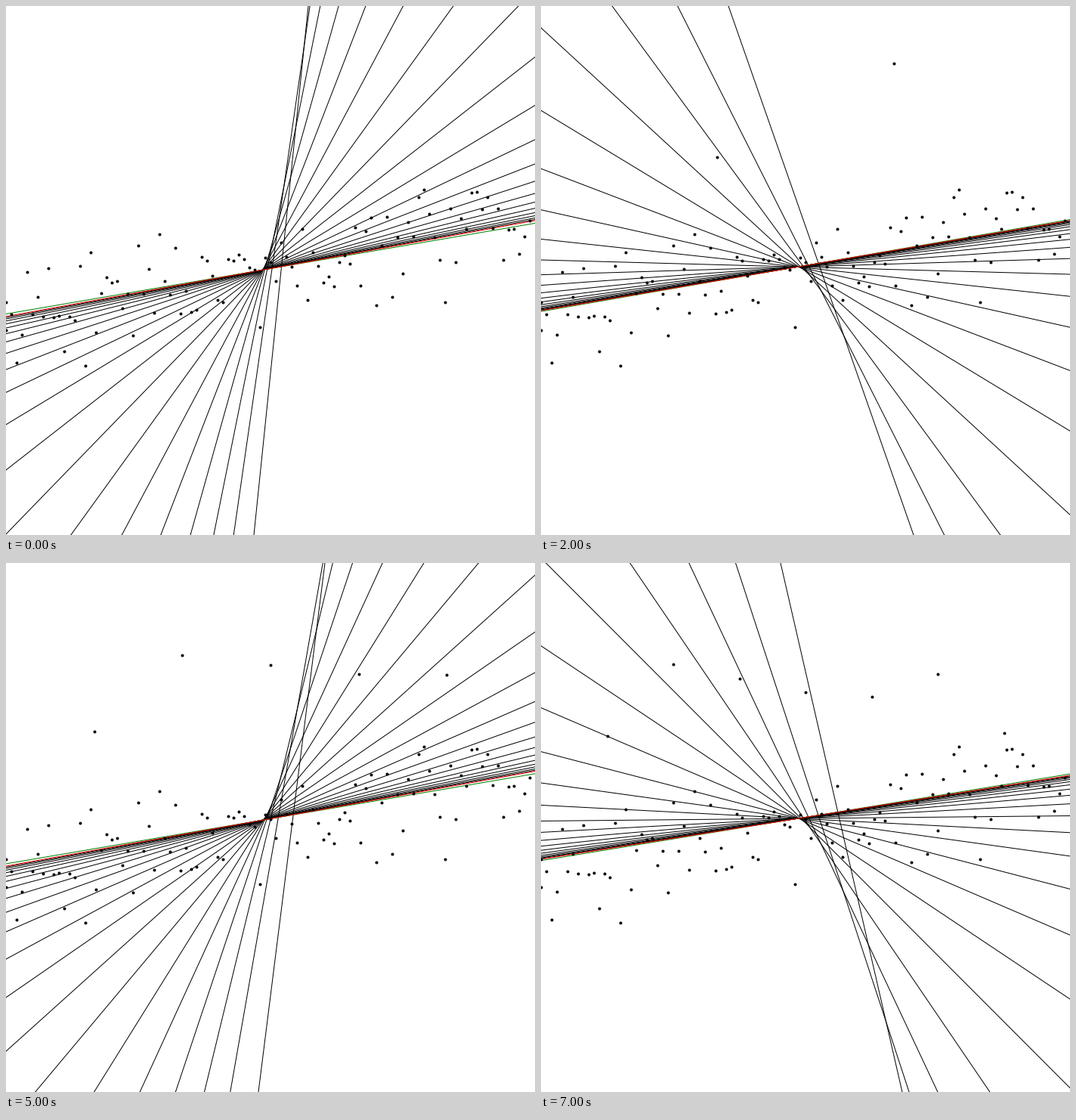
Write a matplotlib script that moves like this. It is 700x700 px and loops after 8000 ms.

```python
import numpy as np
import matplotlib.pyplot as plt
from matplotlib.animation import FuncAnimation
from matplotlib.collections import LineCollection

SIZE, DPI = 700, 100
FRAMES, STEPS = 8, 20
RATE, RIDGE = 0.635, 0.039      # descent rate and slope penalty
CENTRE, SCALE = 348, 315        # maps x to the regression variable

# Extra points share one slope; these are their heights above it
EXTRA_SLOPE = -0.2
EXTRA = np.array([429, 246.5, 169, 205.3, 240.8, 264.6, 252, 347.5])

# Where the first guess meets the top and bottom edges
GUESS = [(400, 328), (295, 380), (248, 493), (400, 318),
         (416, 313), (422, 334), (280, 440), (317, 478)]


def make_cloud(count=100, start=412.3, slope=-0.186, spread=36):
    """Evenly spaced noisy points whose best line is exactly the given one."""
    x = np.arange(count) * SIZE / count
    noise = np.random.default_rng(4).normal(size=count)
    noise -= np.polyval(np.polyfit(x, noise, 1), x)
    return x, start + slope * x + spread * noise / noise.std()


CLOUD_X, CLOUD_Y = make_cloud()


def points(n):
    """The cloud plus n + 1 evenly spread extra points."""
    x = SIZE * np.arange(n + 1) / (n + 1)
    y = EXTRA[:n + 1] + EXTRA_SLOPE * x
    return np.append(CLOUD_X, x), np.append(CLOUD_Y, y)


def descend(x, y, guess):
    """Weights of every descent step and of the exact solution."""
    u = (x - CENTRE) / SCALE
    hess = np.array([[np.mean(u * u) + RIDGE, u.mean()], [u.mean(), 1]])
    grad = np.array([np.mean(u * y), y.mean()])
    top, bottom = guess
    slope = SIZE / (bottom - top)
    w = np.array([slope * SCALE, slope * (CENTRE - top)])
    path = [w]
    for _ in range(STEPS):
        w = w - RATE * (hess @ w - grad)
        path.append(w)
    return path, np.linalg.solve(hess, grad)


def segment(w):
    x = np.array([-10, SIZE + 10])
    return np.column_stack([x, w[0] * (x - CENTRE) / SCALE + w[1]])


fig = plt.figure(figsize=(SIZE / DPI, SIZE / DPI), dpi=DPI, facecolor="white")
ax = fig.add_axes([0, 0, 1, 1])
ax.set_xlim(0, SIZE)
ax.set_ylim(SIZE, 0)
ax.axis("off")

px = 72 / DPI
lines = LineCollection([], linewidths=px)
ax.add_collection(lines, autolim=False)
dots, = ax.plot([], [], "o", color="black", ms=4 * px, mew=0, zorder=3)


def draw(n):
    x, y = points(n)
    path, best = descend(x, y, GUESS[n])
    lines.set_segments([segment(w) for w in path[:-1] + [best, path[-1]]])
    lines.set_color(["black"] * STEPS + ["green", "red"])
    dots.set_data(x, y)
    return lines, dots


anim = FuncAnimation(fig, draw, frames=FRAMES, interval=1000,
                     repeat=True, repeat_delay=0)
plt.show()
```
